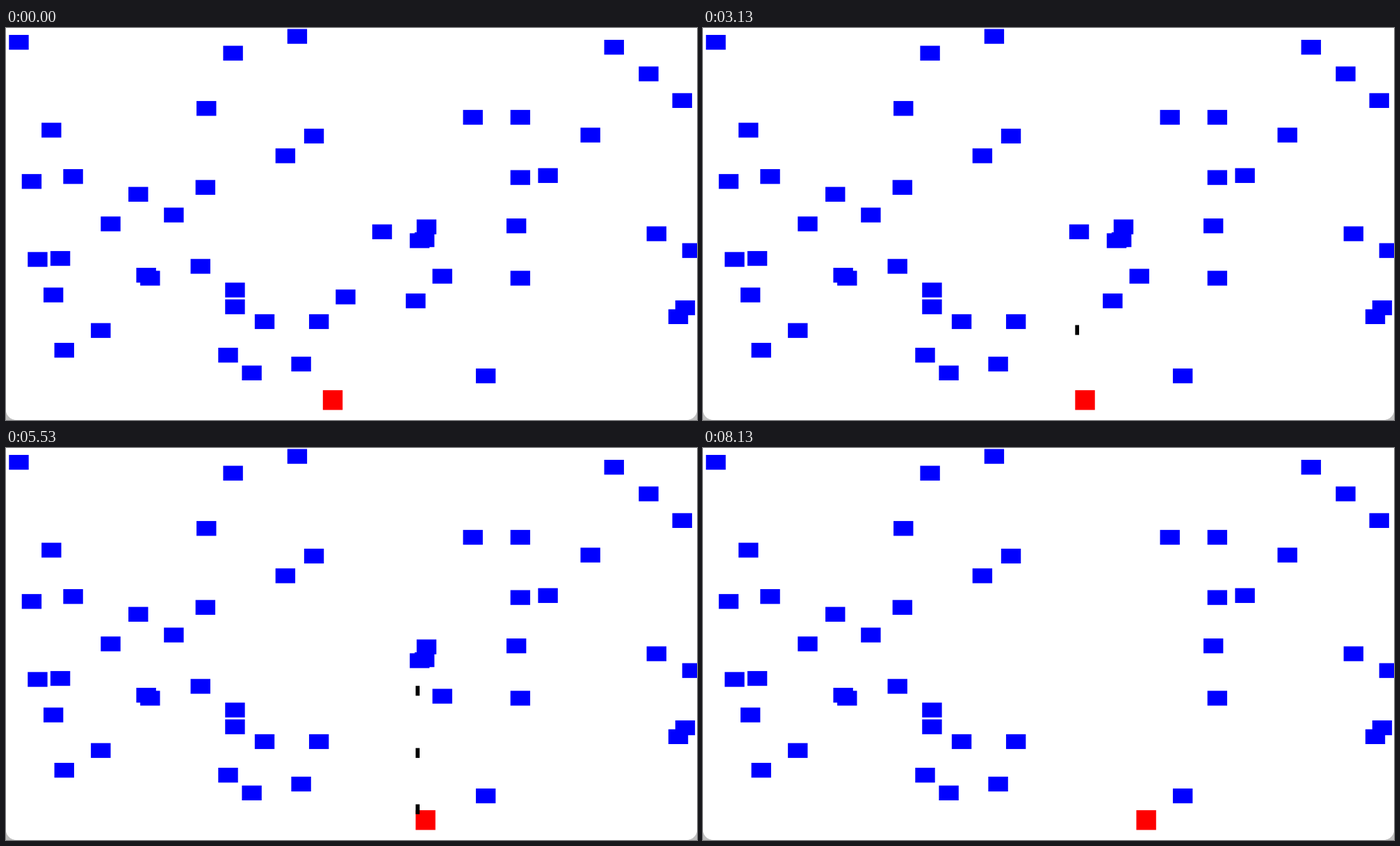
Write an HTML page with a canvas that moves like this. It is 994 by 564 pixels and loops after 8410 ms.

```html
<!DOCTYPE html>
<html lang="en">
<head>
<meta charset="utf-8">
<title>Block shooter</title>
<style>
  html, body { margin: 0; width: 100%; height: 100%; overflow: hidden; background: #c0c0c0; }
  canvas { display: block; border-radius: 0 0 15px 15px; background: #fff; }
</style>
</head>
<body>
<canvas id="stage" width="994" height="564"></canvas>
<script>
const LOOP = 8410;
const TICK = 100 / 3;
const SCALE = 1.42; // the game field is 700 units wide
const BLOCK = { w: 20, h: 15 };
const BULLET = { w: 4, h: 10, speed: 6 };
const PLAYER = { x: 321, y: 367, size: 20 };
const ctx = document.getElementById('stage').getContext('2d');

// The level: left and top of each block, in game units
const blocks = [
  [3, 7], [36, 96], [16, 148], [58, 143], [124, 161], [160, 182], [192, 154],
  [96, 191], [193, 74], [220, 18], [285, 1], [302, 102], [273, 122],
  [22, 227], [45, 226], [38, 263], [132, 243], [136, 246], [86, 299], [49, 319],
  [187, 234], [222, 258], [222, 275], [252, 290], [307, 290], [334, 265],
  [215, 324], [239, 342], [289, 333], [476, 345], [371, 199], [405, 269],
  [432, 244], [416, 194], [409, 208], [414, 207], [463, 83], [511, 83],
  [511, 144], [507, 193], [511, 246], [539, 142], [582, 101], [606, 12],
  [641, 39], [675, 66], [649, 201], [685, 218], [678, 276], [671, 285]
].map(([x, y]) => ({ x, y, goneAt: Infinity }));

// Player moves in ticks and units
const moves = [
  { from: 14, to: 20, by: 11 },
  { from: 24, to: 28, by: 4 },
  { from: 49, to: 50, by: 1 },
  { from: 63, to: 78, by: 40 },
  { from: 97, to: 116, by: 34 },
  { from: 136, to: 144, by: 4 },
  { from: 208, to: 222, by: 24 }
];

const ease = p => p * p * (3 - 2 * p);
const clamp = p => Math.min(1, Math.max(0, p));

function playerX(tick) {
  const moved = moves.reduce(
    (sum, { from, to, by }) => sum + by * ease(clamp((tick - from) / (to - from))), 0);
  return PLAYER.x + Math.round(moved);
}

const bulletY = (shot, tick) => PLAYER.y - BULLET.speed * (tick - shot.firedAt);

// Fly until the bullet overlaps a block or leaves the field
function fire(firedAt) {
  const shot = { firedAt, x: playerX(firedAt) };
  const inLane = blocks.filter(({ x, goneAt }) =>
    goneAt === Infinity && x < shot.x + BULLET.w && shot.x < x + BLOCK.w);
  for (let tick = Math.ceil(firedAt); ; tick++) {
    const y = bulletY(shot, tick);
    const hits = inLane.filter(b => y < b.y + BLOCK.h && b.y < y + BULLET.h);
    if (hits.length || y < -BULLET.h) {
      hits.forEach(b => { b.goneAt = tick; });
      return { ...shot, goneAt: tick };
    }
  }
}

const shots = [48.5, 83, 120, 145, 155.5, 165, 225.5].map(fire);

function rect(color, x, y, w, h) {
  ctx.fillStyle = color;
  ctx.fillRect(x, y, w, h);
}

function draw(time) {
  const tick = Math.floor((time % LOOP + 4) / TICK);
  ctx.setTransform(SCALE, 0, 0, SCALE, 0, 0);
  rect('#fff', 0, 0, 700, 400);
  for (const { x, y, goneAt } of blocks) {
    if (tick < goneAt) rect('#0000fe', x, y, BLOCK.w, BLOCK.h);
  }
  rect('#fe0000', playerX(tick), PLAYER.y, PLAYER.size, PLAYER.size);
  for (const shot of shots) {
    if (tick >= shot.firedAt + 1 && tick < shot.goneAt) {
      rect('#000', shot.x, bulletY(shot, tick), BULLET.w, BULLET.h);
    }
  }
}

const begin = performance.now();
function loop() {
  draw(performance.now() - begin);
  requestAnimationFrame(loop);
}
loop();
</script>
</body>
</html>
```
